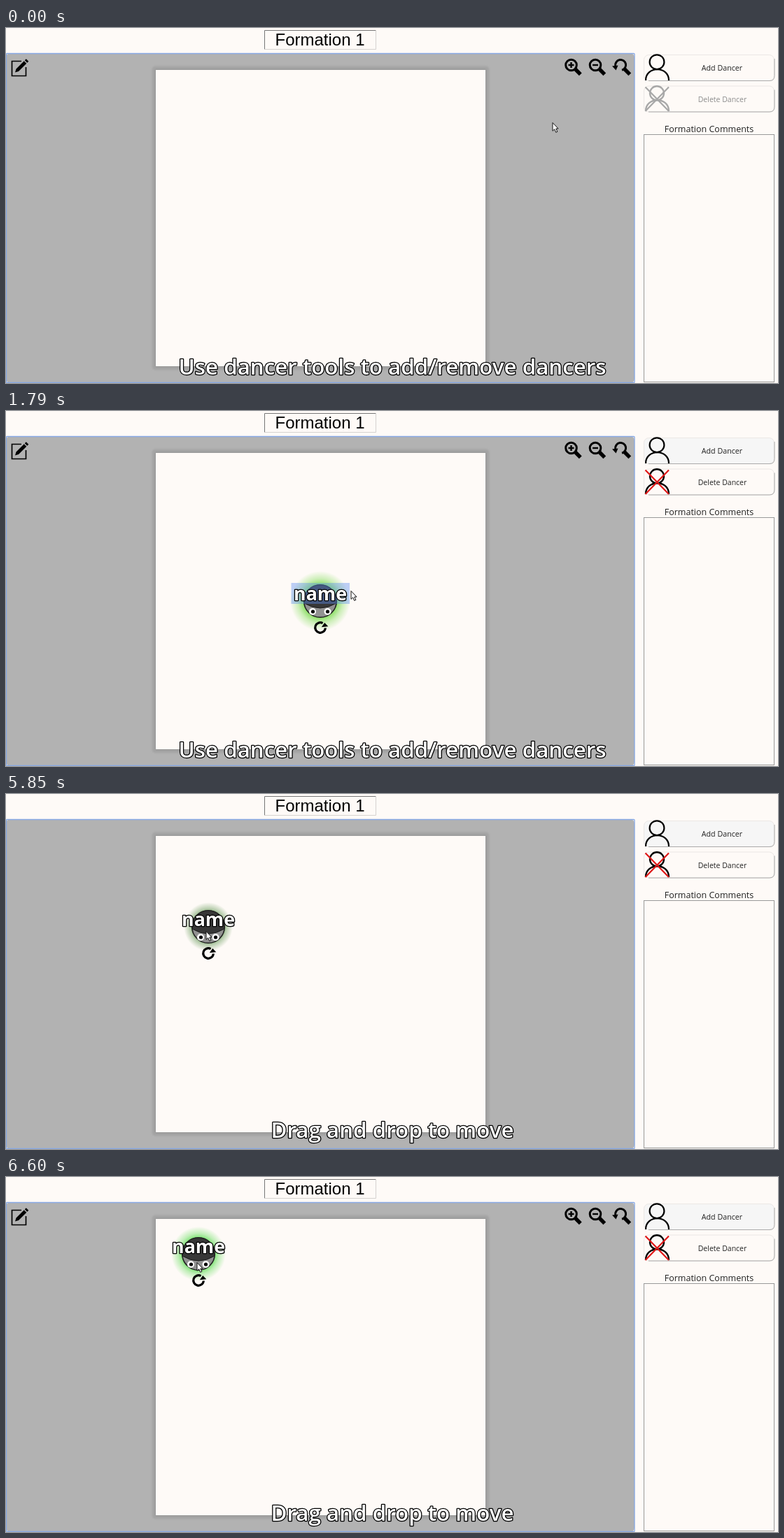
An HTML page that plays this animation: 1103 by 508 pixels, repeating every 8 s.

```html
<!DOCTYPE html>
<html lang="en">
<head>
<meta charset="utf-8">
<title>Dancer tools</title>
<style>
  html, body { margin: 0; width: 100%; height: 100%; overflow: hidden; background: #fefaf7; }
  svg { display: block; width: 1103px; height: 508px; font-family: "Open Sans", sans-serif; }
  .line { fill: none; stroke: #000; }
  .label { text-anchor: middle; fill: #222; }
  .outlined { text-anchor: middle; fill: #fff; stroke: #000; stroke-width: 2.6px; stroke-linejoin: round; paint-order: stroke; }
  .caption { font-size: 31.3px; font-weight: 600; }
  .disabled .line { stroke: #a8a8a8; }
  .disabled text { fill: #8c8c8c; }
  .disabled .cross { stroke: #a8a8a8; }
  .cross { fill: none; stroke: #e01818; stroke-width: 2.2px; }
</style>
</head>
<body>
<svg viewBox="0 0 1103 508">
  <defs>
    <radialGradient id="glow">
      <stop offset=".55" stop-color="currentColor" stop-opacity=".9"/>
      <stop offset=".75" stop-color="currentColor" stop-opacity=".4"/>
      <stop offset="1" stop-color="currentColor" stop-opacity="0"/>
    </radialGradient>
    <filter id="soft" x="-5%" y="-5%" width="110%" height="110%"><feGaussianBlur stdDeviation=".8"/></filter>
    <path id="handle" class="line" d="M5.5 5.5L13.3 13.3" stroke-width="5.4"/>
    <g id="lens">
      <circle class="line" r="7.8" stroke-width="3"/>
      <use href="#handle"/>
    </g>
    <g id="frame">
      <rect x="911.5" y=".5" width="186" height="37" rx="7" stroke="#ebe7e5"/>
      <path d="M918 37.5H1091Q1098 37.5 1098 30.5V6" fill="none" stroke="#aaa"/>
    </g>
  </defs>

  <rect width="1103" height="508" fill="#fefaf7"/>
  <path d="M369.5 30.5V3.5H528.5" fill="none" stroke="#777"/>
  <path d="M369.5 30.5H528.5V3.5" fill="none" stroke="#d5d2d0"/>
  <text x="448.5" y="25" text-anchor="middle" font-size="24" font-family="Liberation Sans, Arial, sans-serif">Formation 1</text>

  <rect y="36" width="898" height="472" rx="6" fill="#b2b2b2"/>
  <rect id="outline" x=".5" y="36.5" width="897.5" height="471" fill="none" stroke-width="1.3"/>
  <rect x="208.5" y="54.5" width="482" height="435" rx="5" fill="#a4a4a4" filter="url(#soft)"/>
  <rect x="213" y="59" width="473" height="426" fill="#969696" filter="url(#soft)"/>
  <rect x="214" y="60" width="471" height="424" fill="#fefaf7"/>

  <g id="icons">
    <path class="line" d="M22 47.5H8.5V68.5H28.5V56" stroke-width="1.7"/>
    <path d="M13 63.5L14.5 58.5L25.8 47.2L29.3 50.7L18 62Z M26.8 46.2L28.8 44.2L32.3 47.7L30.3 49.7Z"/>
    <g transform="translate(807.5 53)"><use href="#lens"/><path class="line" d="M-4 0H4M0-4V4" stroke-width="2.4"/></g>
    <g transform="translate(842 53)"><use href="#lens"/><path class="line" d="M-4 0H4" stroke-width="2.4"/></g>
    <g transform="translate(878 53)">
      <path class="line" d="M-7.3 1A7.5 7.5 0 1 1 2 7.2" stroke-width="3"/>
      <use href="#handle"/>
      <path d="M-12 1.5L-3.5 .5L-6.5 7.5Z"/>
    </g>
  </g>

  <use id="addFrame" href="#frame" y="38" fill="#fefaf7"/>
  <g stroke-width="2.2">
    <circle class="line" cx="930" cy="48.7" r="10.4"/>
    <path class="line" d="M914 75C914 54 947 54 947 75"/>
  </g>
  <text id="addText" class="label" x="1023" y="61" font-size="10.7">Add Dancer</text>

  <g id="remove">
    <use href="#frame" y="82.5" fill="#fefaf7"/>
    <g stroke-width="2.4">
      <circle class="line" cx="930" cy="93.3" r="10"/>
      <path class="line" d="M914 119C914 98 947 98 947 119"/>
    </g>
    <path class="cross" d="M913.5 84.5L947 119M947 84.5L913.5 119"/>
    <text class="label" x="1023.5" y="106" font-size="10.5">Delete Dancer</text>
  </g>
  <text class="label" x="1004.5" y="149" font-size="12.5">Formation Comments</text>
  <rect x="911.5" y="152.5" width="186" height="354" fill="none" stroke="#999"/>

  <g id="dancer">
    <circle id="halo" fill="url(#glow)"/>
    <circle r="23.3" fill="#929292" stroke="#222" stroke-width="1.6"/>
    <path d="M-23 3Q0 17 23 3A23.2 23.2 0 1 0-23 3Z" fill="#373737" stroke="#1c1c1c"/>
    <g fill="#fff"><circle cx="-11" cy="15" r="5"/><circle cx="10.5" cy="15" r="5"/></g>
    <circle cx="-10.5" cy="15" r="2.6"/><circle cx="10.5" cy="15" r="2.6"/>
    <rect id="selection" x="-41.5" y="-26" width="83.5" height="30" fill="#5a8cf0" fill-opacity=".4"/>
    <text class="outlined" y="-1" font-size="26.8" font-weight="700">name</text>
    <path class="line" d="M3.5 31.6A7.3 7.3 0 1 0 7.3 38.5" stroke-width="3.2"/>
    <path d="M1.8 37.2L6.2 31L11.3 36.2Z"/>
  </g>

  <text id="caption1" class="outlined caption" x="552" y="496">Use dancer tools to add/remove dancers</text>
  <text id="caption2" class="outlined caption" x="552" y="492">Drag and drop to move</text>
  <path id="cursor" d="M0 .5V12.3L2.7 9.8L4.7 14.3L6.8 13.4L4.8 9H8.1Z" fill="#fff" stroke="#111"/>
</svg>

<script>
const LOOP = 8000;
const el = id => document.getElementById(id);

const linear = u => u;
const smooth = u => u * u * (3 - 2 * u);
const easeIn = p => u => u ** p;
const easeOut = p => u => 1 - (1 - u) ** p;

// Each move: start, end, number of screen updates, x, y, easing
const cursorPath = { x: 781, y: 135, moves: [
  [290, 670, 6, 950, 55, smooth],
  [1490, 1790, 5, 493, 257, smooth],
  [5020, 5180, 3, 447, 284, easeIn(2)],
  [5470, 5850, 6, 286, 196, easeIn(1.7)],
  [6080, 6160, 2, 284, 150, linear],
  [6230, 6600, 6, 273, 122, easeOut(2)]
] };
const dancerPath = { x: 449, y: 272, moves: [
  [5470, 5850, 6, 289, 190, easeIn(2.5)],
  [6080, 6160, 2, 285, 141, linear],
  [6230, 6600, 6, 275, 110, easeOut(2)]
] };

function locate({ x, y, moves }, t) {
  for (const [start, end, steps, toX, toY, ease] of moves) {
    if (t < start) break;
    const step = Math.floor((t - start) / (end - start) * (steps - 1) + 0.15) + 1;
    const u = ease(Math.min(step, steps) / steps);
    x += (toX - x) * u;
    y += (toY - y) * u;
  }
  return [x, y];
}

const place = (id, [x, y]) => el(id).setAttribute("transform", `translate(${x} ${y})`);
const show = (id, on) => el(id).style.display = on ? "" : "none";

function setGlow(color, radius) {
  el("glow").style.color = color;
  el("halo").setAttribute("r", radius);
}

function draw(t) {
  const pointer = locate(cursorPath, t);
  const added = t >= 980;
  const dragging = t >= 5470 && t < 6595;
  const onPanel = pointer[0] < 898;

  place("cursor", pointer);
  place("dancer", locate(dancerPath, t));
  show("dancer", added);
  show("selection", t < 5470);
  show("icons", !dragging);
  show("caption1", t < 5020);
  show("caption2", t >= 5020);

  if (t < 5470) setGlow("#84dd5c", 43);
  else if (dragging) setGlow("#568f48", 35);
  else setGlow("#62dd58", 39);

  el("outline").setAttribute("stroke", onPanel ? "#86a8e4" : "#4f70ae");
  el("outline").setAttribute("rx", onPanel ? 1 : 6);
  el("addFrame").setAttribute("fill", t >= 1490 ? "#f6f6f6" : "#fefaf7");
  el("addText").style.opacity = pointer[0] > 911 ? 0.75 : 1;
  el("remove").setAttribute("class", added ? "" : "disabled");
}

const begin = performance.now();
function tick() {
  draw((performance.now() - begin) % LOOP);
  requestAnimationFrame(tick);
}
tick();
</script>
</body>
</html>
```
